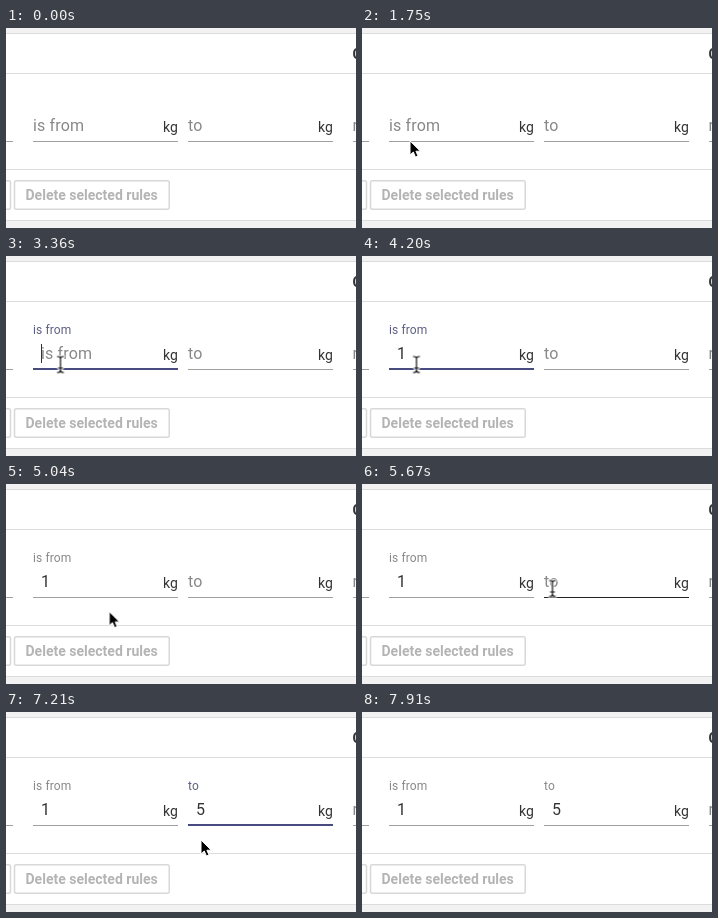
Animation of 350 by 200 pixels, one loop 8.96 s. Source, as an HTML page:

```html
<!DOCTYPE html>
<html lang="en">
<head>
<meta charset="utf-8">
<title>Weight range rule</title>
<style>
  html, body { margin: 0; width: 100%; height: 100%; overflow: hidden; background: #fff; }
  svg { display: block; width: 350px; height: 200px; }
  text { font-family: Roboto, sans-serif; font-size: 16px; letter-spacing: .15px; fill: #333; white-space: pre; }
  .muted { fill: #888; }
  .unit { font-size: 14px; letter-spacing: 0; }
  .heading { font-size: 14px; font-weight: 700; }
  .button { font-size: 14px; font-weight: 700; letter-spacing: 0; fill: #b4b4b4; }
  .outline { fill: none; stroke: #d8d8d8; stroke-width: 1.5; }
  .divider { fill: #dcdcdc; }
  .line { fill: #a0a0a0; }
  .hover { fill: #222; }
  .ripple { fill: #474b80; }
  .caret { fill: #333; }
  .ibeam { fill: none; stroke-linecap: round; }
</style>
</head>
<body>
<svg id="stage" viewBox="0 0 350 200">
  <rect width="350" height="200" fill="#fff"/>
  <rect width="350" height="5" fill="#f2f2f2"/>
  <rect y="193" width="350" height="7" fill="#f2f2f2"/>
  <g class="divider">
    <rect y="5" width="350" height="1"/>
    <rect y="45" width="350" height="1"/>
    <rect y="141" width="350" height="1"/>
    <rect y="192" width="350" height="1"/>
  </g>
  <text class="heading" x="346.5" y="31">C</text>
  <text class="muted" x="346.5" y="103">r</text>
  <rect class="line" y="113" width="7" height="1"/>
  <rect class="line" x="347" y="113" width="3" height="1"/>
  <rect class="outline" x="-60" y="152.75" width="64.5" height="28.5" rx="2"/>
  <rect class="outline" x="8.5" y="152.75" width="154.75" height="28.5" rx="2"/>
  <text class="button" x="19.5" y="172">Delete selected rules</text>
</svg>
<script>
const LOOP = 8960;
const STANDARD = 'cubic-bezier(.4, 0, .2, 1)';
const stage = document.getElementById('stage');

function add(tag, attrs, text = '', parent = stage) {
  const el = document.createElementNS('http://www.w3.org/2000/svg', tag);
  for (const [name, value] of Object.entries(attrs)) el.setAttribute(name, value);
  el.textContent = text;
  parent.append(el);
  return el;
}

// rows: [ms, value, easing towards the next row]
function play(el, prop, rows) {
  const all = [[0, rows[0][1], rows[0][0] ? 'step-end' : rows[0][2]], ...rows.filter(r => r[0] > 0),
               [LOOP, rows[rows.length - 1][1]]];
  el.animate(all.map(([ms, value, easing = 'linear']) => ({ offset: ms / LOOP, [prop]: value, easing })),
    { duration: LOOP, iterations: Infinity });
}

// Shows an element only inside the given [on, off] spans.
function showDuring(el, spans) {
  play(el, 'opacity', [[0, 0, 'step-end'],
    ...spans.flatMap(([on, off]) => [[on, 1, 'step-end'], [off, 0, 'step-end']])]);
}

function field({ x, label, digit, origin, hover, focus, typed, blur, caretBefore, caretAfter }) {
  const bar = (cls, y, height) => add('rect', { class: cls, x, y, width: 145, height });
  bar('line', 113, 1);
  showDuring(bar('hover', 113, 1), [hover]);

  const ripple = bar('ripple', 112, 2);
  ripple.style.transformOrigin = `${origin}px 113px`;
  play(ripple, 'transform', [[0, 'scaleX(0)'], [focus - 15, 'scaleX(0)', STANDARD], [focus + 150, 'scaleX(1)']]);
  play(ripple, 'opacity', [[0, 1], [blur, 1, STANDARD], [blur + 180, 0]]);

  const name = add('text', { class: 'muted' }, label);
  const rest = `translate(${x}px, 103px) scale(1)`;
  play(name, 'transform', [[0, rest], [focus + 5, rest, STANDARD],
    [focus + 155, `translate(${x}px, 77.5px) scale(.75)`]]);
  play(name, 'fill', [[0, '#888'], [focus, '#888'], [focus + 150, '#5b5e82'],
    [blur, '#5b5e82'], [blur + 150, '#888']]);

  const hint = add('text', { class: 'muted', x: x + 8, y: 103 }, label);
  play(hint, 'opacity', [[0, 0], [focus + 30, 0], [focus + 190, 1], [typed, 1, 'step-end'], [typed + 1, 0]]);

  showDuring(add('text', { x: x + 8, y: 103 }, digit), [[typed, LOOP - 1]]);
  const caret = offset => add('rect', { class: 'caret', x: x + offset, y: 88, width: 1, height: 19 });
  showDuring(caret(8), caretBefore);
  showDuring(caret(17), caretAfter);
  add('text', { class: 'unit', x: x + 130, y: 104 }, 'kg');
}

function pointer(draw, spans, points) {
  const g = add('g', {});
  draw(g);
  showDuring(g, spans);
  play(g, 'transform', points.map(([ms, x, y, easing]) => [ms, `translate(${x}px, ${y}px)`, easing]));
}

const drawArrow = g => add('path', {
  d: 'M0 0V14L3.3 11L5.4 16L8 15L5.9 10.2H10.3Z',
  fill: '#000', stroke: '#fff', 'stroke-width': 1
}, '', g);

function drawIbeam(g) {
  const d = 'M-3-8Q0-8 0-6V6Q0 8-3 8M3-8Q0-8 0-6M0 6Q0 8 3 8M-2 3.5H2';
  for (const [stroke, width] of [['#fff', 3], ['#111', 1.2]])
    add('path', { class: 'ibeam', d, stroke, 'stroke-width': width }, '', g);
}

field({
  x: 27, label: 'is from', digit: '1', origin: 54,
  hover: [1820, 4480], focus: 2310, typed: 3430, blur: 4690,
  caretBefore: [[2380, 2870], [3360, 3430]],
  caretAfter: [[3430, 3920], [4410, 4690]]
});
field({
  x: 182, label: 'to', digit: '5', origin: 190,
  hover: [5600, 7000], focus: 5870, typed: 6650, blur: 7490,
  caretBefore: [[5880, 6370]],
  caretAfter: [[6650, 7140]]
});

pointer(drawArrow, [[1470, 1820], [4480, 5600], [7000, 7910]], [
  [0, 2, 136], [1470, 2, 136], [1750, 48, 113], [1820, 52, 110, 'step-end'],
  [4480, 55, 120, 'ease-out'], [4550, 56, 126], [4690, 56, 126, 'ease-in'],
  [4900, 75, 132], [5250, 145, 121, 'ease-out'], [5530, 182, 107, 'step-end'],
  [7000, 192, 117, 'ease-out'], [7210, 195, 128], [7490, 195, 128, 'ease-in'],
  [7700, 250, 134], [7910, 351, 130]
]);
pointer(drawIbeam, [[1820, 3430], [4200, 4480], [5600, 6650], [6860, 7000]], [
  [0, 53, 110], [1820, 53, 110, 'ease-out'], [2030, 54.5, 108.5], [4270, 54.5, 108.5, 'ease-in'],
  [4480, 55, 117, 'step-end'], [5600, 190.5, 104.5], [6860, 190.5, 104.5, 'ease-in'], [7000, 191.5, 114]
]);
</script>
</body>
</html>
```
